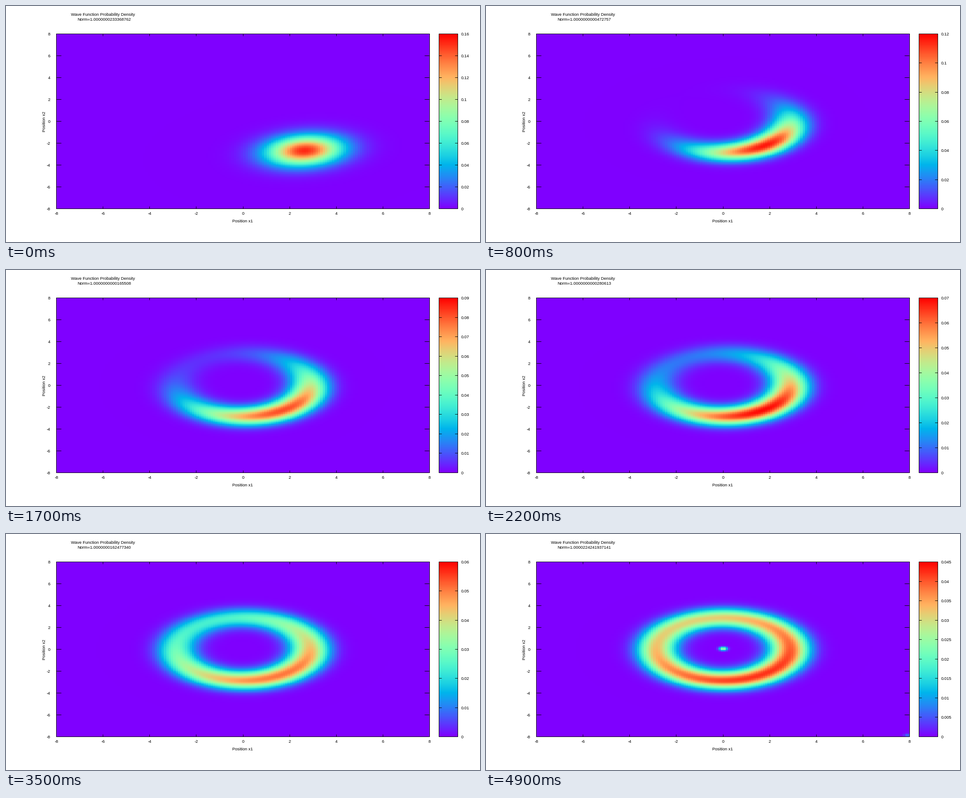
Write a matplotlib script that moves like this. It is 1058 px wide and 529 px high and loops after 5000 ms.

```python
import math

import matplotlib.pyplot as plt
import numpy as np
from matplotlib.animation import FuncAnimation
from matplotlib.collections import LineCollection
from matplotlib.patches import Rectangle

WIDTH, HEIGHT, DPI = 1058, 529, 100
FRAMES, INTERVAL = 50, 100
LEFT, RIGHT, TOP, BOTTOM = 112.5, 945.5, 62.5, 454.5
BAR_LEFT, BAR_RIGHT = 966.5, 1008.5
STROKE = dict(linewidth=72 / DPI, snap=False)
FONT = dict(family="Liberation Sans", size=9.4 * 72 / DPI, color="black")

RING_RADIUS, RING_DENSITY = 2.87, 0.0365
SIGMA_IN, SIGMA_OUT = 0.61, 0.57

# Frame and deviation of the norm from one
NORM_FRAMES = [0, 5, 12, 22, 28, 42, 49]
NORM_ERRORS = [2.33368762e-8, 1.543377e-10, 9.7617e-12, 2.80613e-11,
               4.721523e-10, 5.591180214e-7, 2.24241937141e-5]

centers = np.linspace(-7.95, 7.95, 160)
X, Y = np.meshgrid(centers, centers)
R, THETA = np.hypot(X, Y), np.arctan2(Y, X)


def rainbow(level):
    level = np.clip(level, 0, 1)
    return np.stack([np.abs(2 * level - 0.5),
                     np.sin(np.pi * level),
                     np.clip(np.cos(np.pi / 2 * level), 0, 1)], axis=-1)


def on_pixel(v):
    return math.floor(v) + 0.5


def px(x):
    return on_pixel(LEFT + (x + 8) / 16 * (RIGHT - LEFT))


def py(y):
    return on_pixel(BOTTOM - (y + 8) / 16 * (BOTTOM - TOP))


def start_packet():
    u, v, rho = (X - 2.63) / 1.13, (Y + 2.7) / 0.95, 0.14
    return 0.152 * np.exp(-(u * u - 2 * rho * u * v + v * v) / (2 * (1 - rho ** 2)))


def ring_packet(k):
    """Packet relaxed onto the ring, diffusing along its angle."""
    settle = math.exp(-1.4 * k)
    radius = RING_RADIUS + 0.9 * settle
    widen = 1 + 0.5 * settle
    sigma = np.where(R < radius, SIGMA_IN, SIGMA_OUT) * widen
    radial = np.exp(-((R - radius) / sigma) ** 2 / 2)

    spread = 0.0975 + 0.0645 * k
    phi = math.radians(-54 + 7 * math.exp(-0.15 * k))
    wave, norm = 1.0, 1.0
    for m in range(1, 9):
        a = 2 * math.exp(-spread * m * m)
        wave = wave + a * np.cos(m * (THETA - phi))
        norm += a * a / 2
    scale = RING_DENSITY * RING_RADIUS / (radius * widen)
    return scale * radial * wave ** 2 / norm


def spot(x, y, sigma):
    return np.exp(-((X - x) ** 2 + (Y - y) ** 2) / (2 * sigma ** 2))


def density(k):
    packet = ring_packet(k) if k else start_packet()
    growth = math.exp(0.527 * (k - 49))
    return packet + growth * (0.028 * spot(0, 0.03, 0.12)
                              + 0.007 * spot(7.9, -7.87, 0.1))


def tic_step(peak):
    power = 10 ** math.floor(math.log10(peak))
    density_of_tics = 20 * power / peak
    if density_of_tics > 10:
        return 0.2 * power
    return (0.5 if density_of_tics > 4 else 1) * power


def norm_text(k):
    error = math.exp(np.interp(k, NORM_FRAMES, np.log(NORM_ERRORS)))
    return f"Norm={1 + error:.16f}"


def side_tics(x0, x1, y, length):
    return [[(x0, y), (x0 + length, y)], [(x1 - length, y), (x1, y)]]


fig = plt.figure(figsize=(WIDTH / DPI, HEIGHT / DPI), dpi=DPI, facecolor="white")
ax = fig.add_axes([0, 0, 1, 1])
ax.axis("off")


def label(x, y, text, ha="center", **extra):
    return ax.text(x, y, text, ha=ha, va="baseline", **FONT, **extra)


def frame_box(x0, x1):
    ax.add_patch(Rectangle((x0, TOP), x1 - x0, BOTTOM - TOP, fill=False,
                           edgecolor="black", zorder=4, **STROKE))


def tic_lines(segments):
    lines = LineCollection(segments, colors="black", zorder=3, **STROKE)
    ax.add_collection(lines, autolim=False)
    return lines


heat = ax.imshow(np.zeros((160, 160, 3)), origin="lower", aspect="auto",
                 interpolation="nearest", extent=(LEFT, RIGHT, BOTTOM, TOP))
ax.imshow(rainbow(np.linspace(0, 1, 256))[:, None, :], origin="lower",
          aspect="auto", interpolation="nearest",
          extent=(BAR_LEFT, BAR_RIGHT, BOTTOM, TOP))
ax.set_xlim(0, WIDTH)
ax.set_ylim(HEIGHT, 0)
frame_box(LEFT, RIGHT)
frame_box(BAR_LEFT, BAR_RIGHT)

tics = []
for value in range(-8, 9, 2):
    x, y = px(value), py(value)
    tics += side_tics(LEFT, RIGHT, y, 11)
    tics += [[(x, TOP), (x, TOP + 5)], [(x, BOTTOM - 5), (x, BOTTOM)]]
    label(x, 468.5, str(value))
    label(99, y + 3.3, str(value), ha="right")
tic_lines(tics)
bar_tics = tic_lines([])
bar_labels = [label(1016, 0, "", ha="left") for _ in range(12)]

label(216.5, 22, "Wave Function Probability Density")
norm_label = label(219, 33, "")
label(528, 485, "Position x1")
label(88.5, 259, "Position x2", rotation=90, rotation_mode="anchor")


def update(k):
    rho = density(k)
    peak = rho.max()
    step = tic_step(peak)
    count = math.ceil(peak / step - 1e-9)
    heat.set_data(rainbow(rho / (count * step)))
    norm_label.set_text(norm_text(k))

    segments = []
    for i, text in enumerate(bar_labels):
        text.set_visible(i <= count)
        if i <= count:
            y = on_pixel(BOTTOM - (BOTTOM - TOP) * i / count)
            text.set_text(f"{i * step:.4g}")
            text.set_y(y + 3.3)
            segments += side_tics(BAR_LEFT, BAR_RIGHT, y, 6)
    bar_tics.set_segments(segments)
    return heat, norm_label, bar_tics, *bar_labels


anim = FuncAnimation(fig, update, frames=FRAMES, interval=INTERVAL,
                     init_func=lambda: update(0), repeat=True, repeat_delay=0)
plt.show()
```
